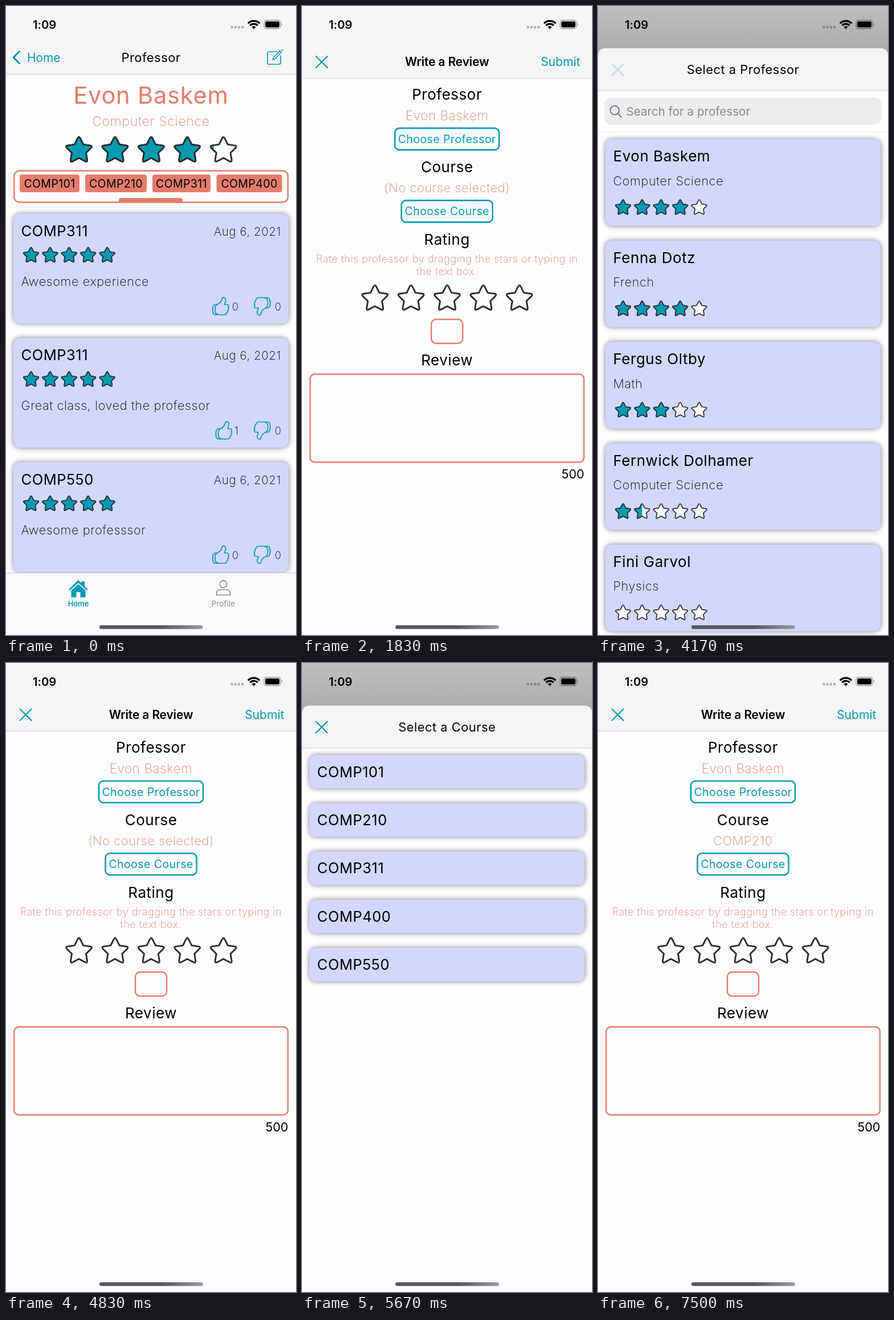
An HTML page for the animation above (8 s loop, 509 by 1101 pixels).

```html
<!DOCTYPE html>
<html lang="en">
<head>
<meta charset="utf-8">
<title>Professor review</title>
<style>
  html, body { margin: 0; width: 100%; height: 100%; overflow: hidden; background: #fdfcfe; }
  svg { display: block; }
  text { font-family: Inter, Roboto, sans-serif; fill: #000; white-space: pre; }
  .m { font-weight: 440; letter-spacing: .02em; }
  .l { font-weight: 250; letter-spacing: .03em; }
  .b { font-weight: 600; letter-spacing: -.003em; }
  .mid { text-anchor: middle; }
  .end { text-anchor: end; }
  .teal { fill: #049bb2; }
  .coral { fill: #e47c6c; }
  .soft { fill: #d98577; }
  .gray { fill: #8a8a8e; }
  .line { fill: none; stroke: #049bb2; stroke-width: 2.4; stroke-linecap: round; stroke-linejoin: round; }
  .thin { stroke-width: 1.7; }
  .box { fill: none; stroke: #e47c6c; stroke-width: 2.5; }
  .btn { fill: none; stroke: #049bb2; stroke-width: 2.6; }
  .card { fill: #d3d7fe; filter: drop-shadow(0 0 5px rgba(0, 0, 0, .5)); }
  .page { fill: #fdfcfe; }
  .bar { fill: #f5f4f6; }
  .tabs { fill: #f9f9fb; }
  .field { fill: #ebecee; }
  .rule { fill: #cdccd0; }
  .faint { fill: #e6e5e9; }
  .star { stroke: #2c2c30; stroke-linejoin: round; }
</style>
</head>
<body>
<svg id="stage" width="509" height="1101" viewBox="0 0 509 1101" xmlns="http://www.w3.org/2000/svg"></svg>
<script>
const W = 509, H = 1101, TOP = 74, CX = 254.5;
const LOOP = 8000, FPS = 12;
const NAME = 'Evon Baskem';
const CODES = ['COMP101', 'COMP210', 'COMP311', 'COMP400', 'COMP550'];
const $ = id => document.getElementById(id);

const text = (x, y, s, size, cls) =>
  `<text x="${x}" y="${y}" font-size="${size}" class="${cls}">${s}</text>`;
const rect = (x, y, w, h, r, cls) =>
  `<rect x="${x}" y="${y}" width="${w}" height="${h}" rx="${r}" class="${cls}"/>`;
const path = (d, cls, extra = '') => `<path d="${d}" class="${cls}" ${extra}/>`;
const group = (x, y, body, id = '') =>
  `<g ${id && `id="${id}"`} transform="translate(${x} ${y})">${body}</g>`;

// Five-pointed star with softened tips
function star(cx, cy, r, fill, sw) {
  const pt = i => {
    const a = (i * 36 - 90) * Math.PI / 180, q = i % 2 ? r * .5 : r;
    return [cx + q * Math.cos(a), cy + q * Math.sin(a)];
  };
  const mix = (a, b, k) => a.map((v, i) => (v + (b[i] - v) * k).toFixed(2)).join(' ');
  let d = '';
  for (let i = 0; i < 10; i += 2) {
    const tip = pt(i), a = pt(i + 9), b = pt(i + 1);
    d += `${i ? 'L' : 'M'}${mix(tip, a, .33)}Q${mix(tip, tip, 0)} ${mix(tip, b, .33)}L${mix(b, b, 0)}`;
  }
  return path(d + 'Z', 'star', `fill="${fill}" stroke-width="${sw}"`);
}

function stars(x, y, pitch, r, sw, rating) {
  const row = fill => [0, 1, 2, 3, 4].map(i => star(x + i * pitch, y, r, fill, sw)).join('');
  const whole = Math.floor(rating), wide = r * 1.84;
  const edge = x + whole * pitch - wide / 2 + (rating - whole) * wide;
  const full = rating ? `<svg width="${edge}" height="${H}">${row('#049bb2')}</svg>` : '';
  return row('#fefdff') + full;
}
const bigStars = (y, rating) => stars(128, y, 63.4, 26.1, 2.9, rating);
const smallStars = (y, rating) => stars(44, y, 33.4, 15.5, 1.7, rating);

const cross = (y, id) =>
  path(`M24.5 ${y - 10}l20 20m0-20l-20 20`, 'line', `id="${id}" style="stroke-width:2.2"`);

const THUMB = path('M9 13C14 11 17 7 18 2C20-1 25 1 24 7L22 13H26C30 13 30 17 28 18C30 19 29.5 22 27.5 23' +
  'C28.5 25 27.5 27 26 27C26 30 24 31 21 31H14C11 31 10 29.5 7.5 29.5', 'line thin') +
  path('M9 13H5C0 15 0 29 5 31H10C4 29 4 16 9 13', 'line thin');

function reviewCard(y, course, note, up) {
  return rect(13, y, 483, 192, 12, 'card') +
    text(26.5, y + 39, course, 25.5, 'm') +
    text(483, y + 38, 'Aug 6, 2021', 20.5, 'l end') +
    smallStars(y + 73, 5) +
    text(26.5, y + 126, note, 21.6, 'l') +
    group(up ? 367 : 361.5, y + 146, THUMB) +
    text(408.5, y + 169, up, 18.5, 'l end') +
    `<g transform="translate(465 ${y + 178}) rotate(180)">${THUMB}</g>` +
    text(483.5, y + 169, '0', 18.5, 'l end');
}

function homePage() {
  const pills = [[24, 105], [139, 108], [257, 102], [369.5, 115]];
  return rect(0, 0, W, H, 0, 'page') +
    text(CX, 171, NAME, 41.5, 'm coral mid') +
    text(CX, 210, 'Computer Science', 23, 'l soft mid') +
    bigStars(253, 4.15) +
    pills.map(([x, w], i) => rect(x, 295, w, 31, 4, 'coral') +
      text(x + w / 2, 317.5, CODES[i], 19.5, 'm mid')).join('') +
    path('M198 343V340Q198 336 202 336H306Q310 336 310 340V343Z', 'coral') +
    rect(14.2, 288.5, 480.6, 55, 9, 'box') +
    reviewCard(363.5, 'COMP311', 'Awesome experience', 0) +
    reviewCard(581, 'COMP311', 'Great class, loved the professor', 1) +
    reviewCard(798.5, 'COMP550', 'Awesome professsor', 0) +
    rect(0, 0, W, 119, 0, 'bar') + rect(0, 119, W, 1, 0, 'rule') +
    path('M23.5 79.5L13 90L23.5 100.5', 'line', 'style="stroke-width:3"') +
    text(37, 97.5, 'Home', 20.8, 'teal') +
    text(CX, 97.5, 'Professor', 22, 'm mid') +
    `<g id="edit">${path('M475 80H461.5Q459 80 459 82.5V99.5Q459 102 461.5 102H479.5Q482 102 482 99.5V87', 'line thin')}` +
    `${path('M468 94L469.5 90L481 78.5L483.5 81L472 92.5ZM484 76.5L485.5 78', 'line thin')}</g>` +
    rect(0, 992, W, 109, 0, 'tabs') + rect(0, 992, W, 1, 0, 'rule') +
    path('M110 1021L127 1005L132.5 1010.2V1007H138V1015.5L143.5 1021L141.5 1023L127 1009.5L112 1023Z' +
      'M114.5 1023L127 1012L139.5 1023V1035H130.5V1026H123.5V1035H114.5Z', 'teal') +
    text(127, 1051, 'Home', 12.9, 'b teal mid') +
    '<g fill="none" stroke="#8e8e93" stroke-width="1.7"><circle cx="381.5" cy="1012" r="6.3"/>' +
    '<path d="M369.5 1031V1028Q370 1021.5 377 1021.5H386Q393 1021.5 393.5 1028V1031Z" stroke-linejoin="round"/></g>' +
    text(381.5, 1051, 'Profile', 13, 'm gray mid');
}

function button(y, x, w, label) {
  return rect(x, y, w, 38, 8, 'btn') + text(CX, y + 26, label, 19.6, 'm teal mid');
}

function reviewPage() {
  const heading = (y, s) => text(CX, y, s, 26, 'm mid');
  return rect(0, 0, W, H, 0, 'page') +
    rect(0, 0, W, 119, 0, 'bar') + rect(0, 119, W, 1, 0, 'rule') +
    cross(90.5, 'closeForm') +
    text(CX, 97.5, 'Write a Review', 20.8, 'b mid') +
    text(488.5, 97.5, 'Submit', 21.1, 'teal end') +
    heading(157, 'Professor') +
    text(CX, 192.5, NAME, 22.3, 'l soft mid') +
    button(206.5, 163, 183, 'Choose Professor') +
    heading(283.5, 'Course') +
    `<text id="course" x="${CX}" y="318.5" font-size="21.7" class="l soft mid"></text>` +
    button(333, 174.5, 160, 'Choose Course') +
    heading(410.5, 'Rating') +
    text(CX, 442, 'Rate this professor by dragging the stars or typing in', 18.1, 'l soft mid') +
    text(CX, 464, 'the text box.', 18.1, 'l soft mid') +
    bigStars(505, 0) +
    rect(227, 541, 55, 42, 8, 'box') +
    heading(622, 'Review') +
    rect(14.2, 637, 480.6, 154, 8, 'box') +
    text(495.5, 820, '500', 21.6, 'end');
}

// Sheet with rounded top; local y = 0 is its upper edge
function sheet(title, id, body) {
  return `<rect id="${id}Shade" y="-110" width="${W}" height="126" fill="url(#shade)"/>` +
    path(`M0 ${H}V14Q0 0 14 0H495Q${W} 0 ${W} 14V${H}Z`, 'page') +
    path(`M0 74V14Q0 0 14 0H495Q${W} 0 ${W} 14V74Z`, 'bar') +
    rect(0, 73.5, W, 1, 0, 'rule') +
    cross(37.5, id + 'Close') + text(CX, 45, title, 22, 'm mid') + body;
}

const arcs = (r, from, to) => [0, 180].map(turn => {
  const p = a => [Math.cos((a + turn) * Math.PI / 180) * r, Math.sin((a + turn) * Math.PI / 180) * r];
  return path(`M${p(from)}A${r} ${r} 0 0 1 ${p(to)}`, 'line', 'style="stroke:#50c6dc;stroke-width:2.2"');
}).join('');

function professorSheet() {
  const people = [
    [NAME, 'Computer Science', 4],
    ['Fenna Dotz', 'French', 4],
    ['Fergus Oltby', 'Math', 3.15],
    ['Fernwick Dolhamer', 'Computer Science', 1.5],
    ['Fini Garvol', 'Physics', 0],
  ];
  const list = people.map(([name, dept, rating], i) => {
    const y = 159.3 + i * 177.4;
    return rect(13, y, 483, 151.5, 12, 'card') +
      text(26.5, y + 39, name, 26, 'm') +
      text(26.5, y + 80.5, dept, 21.6, 'l') +
      smallStars(y + 119.7, rating);
  }).join('');
  return sheet('Select a Professor', 'prof',
    rect(11, 86.5, 487, 47, 12, 'field') +
    '<g fill="none" stroke="#7c7c80" stroke-width="2" stroke-linecap="round">' +
    '<circle cx="29.3" cy="108.5" r="7.8"/><path d="M35 114.5L41 120.5"/></g>' +
    text(49.5, 118, 'Search for a professor', 20.6, 'gray') +
    rect(0, 146, W, 1, 0, 'faint') +
    `<g id="list">${list}</g>` +
    group(CX, 551, `<g id="outer">${arcs(46, -83, 5)}</g><g id="inner">${arcs(17.5, -20, 68)}</g>`, 'spinner'));
}

function courseSheet() {
  return sheet('Select a Course', 'pick', CODES.map((code, i) => {
    const y = 86.3 + i * 84.4;
    return rect(13, y, 483, 58.5, 12, 'card') + text(26.5, y + 38.5, code, 25.5, 'm');
  }).join(''));
}

function statusBar() {
  return text(47, 40, '1:09', 20.3, 'b') +
    [0, 1, 2, 3].map(i => `<rect x="${394.5 + i * 6.2}" y="35" width="4.2" height="4.2" rx="1.2" opacity=".27"/>`).join('') +
    '<g fill="none" stroke="#000" stroke-width="3.3"><path d="M424.8 30.5A14.3 14.3 0 0 1 445.2 30.5"/>' +
    '<path d="M428.4 34.2A9.3 9.3 0 0 1 441.6 34.2"/></g><path d="M434.9 40.5L431.2 36.8A5.2 5.2 0 0 1 438.6 36.8Z"/>' +
    '<rect x="453" y="25" width="29" height="14.5" rx="4.5" fill="none" stroke="#000" stroke-opacity=".4" stroke-width="1.3"/>' +
    '<rect x="455" y="27" width="25" height="10.5" rx="2.7"/><path d="M483.5 30Q486 32.2 483.5 34.5Z" opacity=".5"/>';
}

$('stage').innerHTML =
  `<defs>
    <linearGradient id="shade" x2="0" y2="1"><stop offset="0" stop-opacity="0"/><stop offset=".87" stop-opacity=".13"/></linearGradient>
    <linearGradient id="grip"><stop offset=".6" stop-color="#56575d"/><stop offset="1" stop-color="#98989d"/></linearGradient>
  </defs>` +
  homePage() + group(0, H, reviewPage(), 'form') +
  `<rect id="dim" width="${W}" height="${H}" opacity="0"/>` +
  group(0, H, professorSheet(), 'prof') + group(0, H, courseSheet(), 'pick') +
  statusBar() + '<rect x="164" y="1084" width="181.5" height="6.5" rx="3.2" fill="url(#grip)"/>';

// Critically damped spring, stiffness 1000 and mass 3
function spring(t, start) {
  const u = Math.max(0, t - start) / 1000 * Math.sqrt(1000 / 3);
  return 1 - (1 + u) * Math.exp(-u);
}
const set = (id, name, value) => $(id).setAttribute(name, value);
const show = (id, on) => set(id, 'visibility', on ? 'visible' : 'hidden');
const within = (t, a, b) => t >= a && t < b;

function place(id, v) {
  show(id, v > .001);
  set(id, 'transform', `translate(0 ${(TOP + (H - TOP) * (1 - v)).toFixed(2)})`);
  set(id + 'Shade', 'opacity', v);
}

function draw(time) {
  const frame = Math.floor((time + 5) * FPS / 1000);
  const t = frame * 1000 / FPS;
  const form = spring(t, 1445);
  const prof = spring(t, 2397.5) * (1 - spring(t, 4307));
  const pick = spring(t, 5147) * (1 - spring(t, 6977));

  show('form', form > 0);
  set('form', 'transform', `translate(0 ${(H * (1 - form)).toFixed(2)})`);
  place('prof', prof);
  place('pick', pick);
  set('dim', 'opacity', .19 * Math.max(prof, pick));

  set('edit', 'opacity', within(t, 1240, 1410) ? .25 : 1);
  set('profClose', 'opacity', within(t, 4160, 4330) ? .25 : 1);
  $('course').textContent = t < 6990 ? '(No course selected)' : 'COMP210';

  const loaded = t > 2740;
  set('list', 'display', loaded ? 'inline' : 'none');
  set('spinner', 'display', loaded ? 'none' : 'inline');
  const turn = (frame - 31) * 30;
  set('outer', 'transform', `rotate(${turn})`);
  set('inner', 'transform', `rotate(${-turn})`);
}

const begin = performance.now();
function tick() {
  draw((performance.now() - begin) % LOOP);
  requestAnimationFrame(tick);
}
tick();
</script>
</body>
</html>
```
